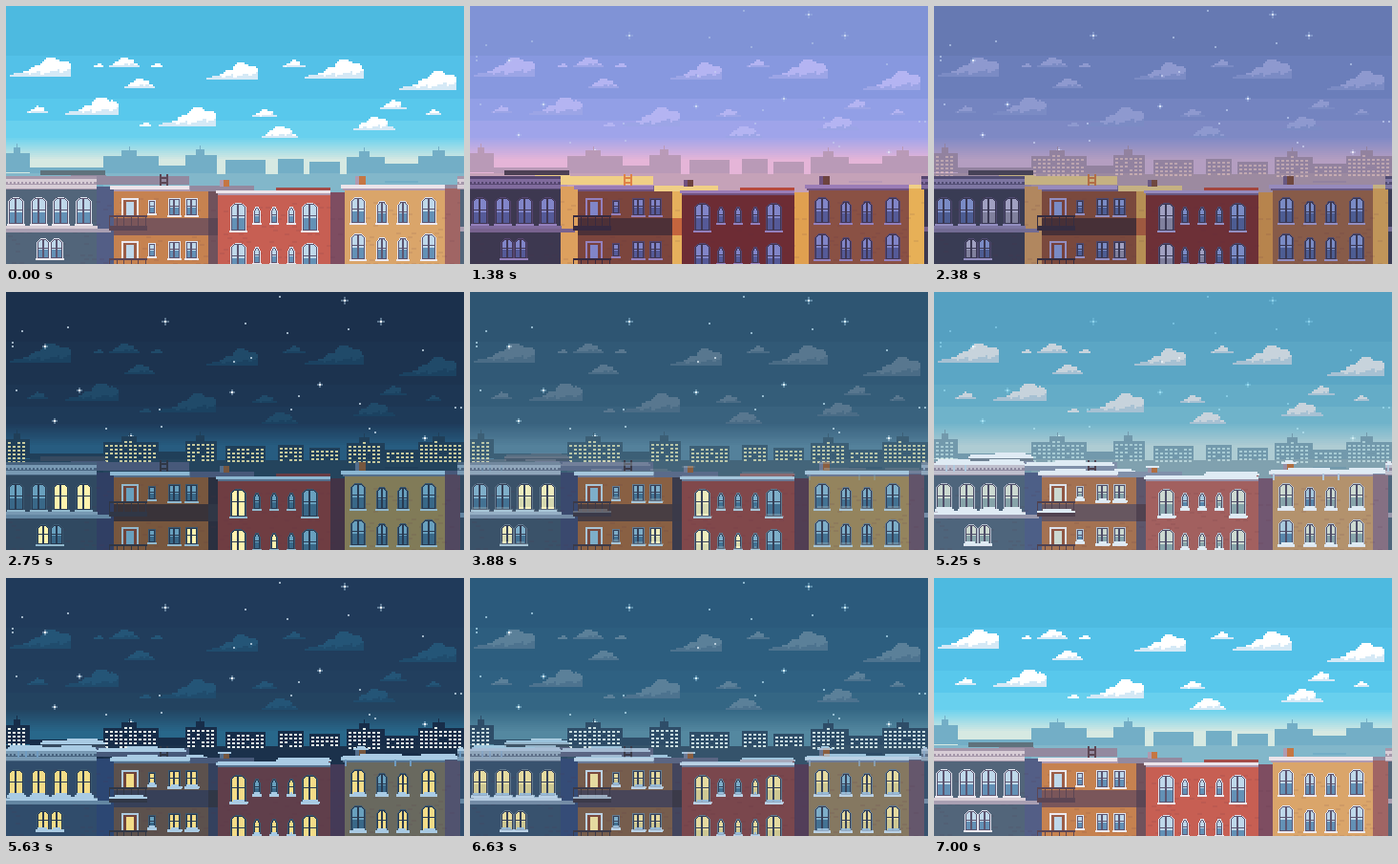
These frames come from a looping animation (480x270 px, 7120 ms). An HTML page with a canvas:

```html
<!DOCTYPE html>
<html>
<head>
<meta charset="utf-8">
<style>
html, body { margin: 0; width: 100%; height: 100%; overflow: hidden; background: #4ebbe1; }
canvas { display: block; width: 480px; height: 270px; image-rendering: pixelated; }
</style>
</head>
<body>
<canvas id="stage" width="480" height="270"></canvas>
<script>
const W = 480, H = 270, LOOP = 7120;

const day = {
  sky: ['#4dbae0', '#53c1e8', '#58c8ec', '#68d0ee', '#d6e9e2'],
  city: ['#73aec6', '#82b7ca'], cloud: ['#ffffff', '#d5e9f6'], stars: 0,
  front: ['#52657a', '#c68250', '#c75f53', '#daa56a'],
  side: ['#535e86', '#70525c', '#7e4d61', '#a06564'],
  brick: '#54304018', cap: '#ece4ea', capShade: '#b09ab0', cornice: '#d8cdd6', corniceShade: '#a597aa',
  ledge: '#a99fb2', roof: ['#5f727c', '#93899f', '#a34c48'], chimney: '#c57643',
  glass: ['#bfd8ea', '#6391b6'], frame: '#5c5570', outline: '#dfe4ef', sill: '#ece9f0',
  shade: '#7a565a', rail: '#5c4654', door: '#9c5e48', lit: 0, glow: '#fff3ae'
};
const dusk = {
  ...day,
  sky: ['#8093d6', '#8798df', '#929fe6', '#9fa4ea', '#e5b5d8'],
  city: ['#b99ab7', '#c5a2b8'], cloud: ['#b4b4f2', '#9ca5e6'], stars: .48,
  front: ['#3d3850', '#7c453d', '#6d2c34', '#8a5144'],
  side: ['#dda05e', '#e6b05c', '#e0a050', '#e7b057'],
  cap: '#9a7cb6', capShade: '#70527f', cornice: '#806b9d', corniceShade: '#55466f',
  ledge: '#78628e', roof: ['#4c4054', '#f0cf86', '#b6493b'], chimney: '#6d433f',
  glass: ['#8185c8', '#555a98'], frame: '#403653', outline: '#55456f', sill: '#9480bd',
  shade: '#4d3037', rail: '#372a40', door: '#78413e'
};
const night = {
  ...day,
  sky: ['#1b304c', '#1c334f', '#1d3653', '#1e3a58', '#275c80'],
  city: ['#203f59', '#24445d'], pane: '#c7c99d', cloud: ['#204a69', '#1b4261'], stars: 1,
  front: ['#304961', '#78573e', '#6f3d42', '#817b58'],
  side: ['#303f64', '#2a3040', '#423346', '#514860'],
  cap: '#8cb7d2', capShade: '#546f8c', cornice: '#7899b3', corniceShade: '#47637f',
  ledge: '#6386a2', roof: ['#364a60', '#47597a', '#683c44'], chimney: '#76573f',
  glass: ['#68a0be', '#396888'], frame: '#283a51', outline: '#3a5870', sill: '#91b8cd',
  shade: '#393339', rail: '#303746', door: '#70443b', lit: .2
};
const winter = {
  ...day,
  sky: ['#68c3e5', '#70cae9', '#7bd2ec', '#8adaef', '#dcefed'],
  city: ['#92bfce', '#a3c8d2'],
  front: ['#596e82', '#bd7e54', '#b96c66', '#cda073'],
  side: ['#59688e', '#6b5e70', '#81617a', '#977a8b'],
  roof: ['#8497a6', '#94a3bb', '#a65d61'],
  shade: '#786064', snow: ['#f2f6fa', '#c5d8e7']
};
const winterNight = {
  ...night,
  sky: ['#203a5a', '#213d5c', '#223f5e', '#234360', '#28678a'],
  city: ['#172d49', '#1b314b'], pane: '#e7efe9', cloud: ['#245577', '#204c6d'],
  front: ['#304c6b', '#5c514d', '#603f4b', '#69695f'],
  side: ['#2c4773', '#34415e', '#443a57', '#51536f'],
  sill: '#adcbe0', shade: '#374058', lit: .75, glow: '#f3dc88', snow: ['#a9cbe4', '#6f9bc0']
};

// Left edge, base, width
const clouds = [
  [4,74,64], [92,64,10], [108,64,32], [152,64,12], [124,86,32], [210,77,54], [290,64,23], [313,76,61], [412,88,60],
  [22,112,22], [62,114,56], [140,126,12], [160,126,60], [258,116,26], [268,138,38], [364,130,44], [392,108,28], [440,114,16]
];
// Left edge, width, top
const blocks = [[0,25,154], [25,77,169], [102,58,157], [160,28,167], [188,33,156], [230,42,161],
  [285,27,160], [318,32,163], [357,40,158], [397,35,165], [432,48,157]];
const sparkles = [[167,31], [355,9], [393,31], [41,57], [77,103], [131,151], [237,105], [329,97], [51,135], [439,153]];

const noise = n => { const v = Math.sin(n * 127.1 + 3.7) * 43758.5453; return v - Math.floor(v); };
const repeat = (count, start, step, draw) => {
  for (let i = 0; i < count; i++) draw(Math.round(start + i * step));
};

function paint(p) {
  const canvas = document.createElement('canvas');
  canvas.width = W; canvas.height = H;
  const g = canvas.getContext('2d');
  let windowId = 0;

  const box = (color, x, y, w, h) => { g.fillStyle = color; g.fillRect(x, y, w, h); };

  function drawSky() {
    [0, 52, 97, 120].forEach((y, i) => box(p.sky[i], 0, y, W, H - y));
    for (let y = 138; y < 200; y += 2) {
      g.globalAlpha = Math.min(1, (y - 136) / 24);
      box(p.sky[4], 0, y, W, 2);
    }
    g.globalAlpha = 1;
  }

  function drawStars() {
    g.globalAlpha = p.stars * .7;
    repeat(22, 1, 1, i => box('#d4e7f4', Math.floor(noise(i) * 240) * 2, Math.floor(noise(i + 50) * 80) * 2, 2, 2));
    sparkles.forEach(([x, y], i) => {
      const r = i < 3 ? 4 : 3;
      g.globalAlpha = p.stars * .4;
      box('#bfdcef', x - r, y - 1, 2 * r, 2);
      box('#bfdcef', x - 1, y - r, 2, 2 * r);
      g.globalAlpha = p.stars;
      box('#ffffff', x - 1, y - 1, 2, 2);
    });
    g.globalAlpha = 1;
  }

  // Round lumps on a thin, tapering base
  function drawCloud([left, base, w]) {
    const h = Math.min(20, Math.max(4, w * .33)), peak = w < 45 ? .5 : .68;
    const lumps = [[peak, .17, 1], [peak + .2, .12, .82], [peak - .22, .15, .58]];
    for (let x = 0; x < w; x += 2) {
      const u = (x + 1) / w;
      let top = h * Math.min(.3, u * .7 + .1, (1 - u) * 3 + .1), tone = .22;
      for (const [center, r, height] of lumps) {
        const d = (u - center) / r;
        if (Math.abs(d) > 1) continue;
        const round = height * h - r * w * .8 * (1 - Math.sqrt(1 - d * d));
        if (round > top) { top = round; tone = .26 + .16 * d; }
      }
      const height = Math.max(2, Math.round(top / 2) * 2);
      const shade = Math.round(h * tone / 2) * 2;
      box(p.cloud[0], left + x, base - height, 2, height);
      if (h > 5) box(p.cloud[1], left + x, base - Math.min(shade, height), 2, Math.min(shade, height));
    }
  }

  function drawCity() {
    box(p.city[1], 0, 176, W, 30);
    for (const [x, w, top] of blocks) {
      const tower = Math.round(w * .32), towerW = Math.round(w * .27), tall = top < 159;
      box(p.city[0], x, top, w, 20);
      if (tall) {
        box(p.city[0], x + tower, top - 6, towerW, 6);
        box(p.city[0], x + tower + (towerW >> 1), top - 10, 1, 4);
      }
      box(p.city[1], x, 175, w, 8);
      if (!p.pane || top > 166) continue;
      for (let y = top - (tall ? 4 : 0) + 3; y < 178; y += 4)
        for (let u = x + 2; u < x + w - 3; u += 5) {
          const inTower = u > x + tower && u + 3 < x + tower + towerW;
          if ((y > top || inTower) && noise(u * 3 + y) > .1) box(p.pane, u, y, 3, 2);
        }
    }
  }

  function drawWall(i, x, y, w, sideW) {
    box(p.front[i], x, y, w, H - y);
    box(p.side[i], x + w, y - 3, sideW, H - y + 3);
    for (let v = y + 8; v < H; v += 4)
      for (let u = x + 2; u < x + w + sideW - 5; u += 8)
        if (noise(u + v * 9 + i) > .8) box(p.brick, u + (v & 4), v, 5, 2);
  }

  function drawSnow(x, y, w, depth) {
    if (!p.snow) return;
    for (let u = 0; u < w; u += 2) {
      const edge = Math.min(1, (u + 2) / 8, (w - u) / 8);
      const rise = Math.round(depth * edge * (.75 + .25 * Math.sin((x + u) * .1)) / 2) * 2;
      box(p.snow[0], x + u, y - rise, 2, rise + 2);
      if (depth > 4 && noise(x + u) > .94) box(p.snow[1], x + u, y + 2, 2, 7);
    }
  }

  function drawWindow(x, y, w, h, arch = true) {
    const lit = noise(++windowId * 7) < p.lit;
    for (let v = 0; v < h; v++) {
      const d = arch ? Math.round(w * .28 * Math.max(0, 1 - v / 5) ** 1.5) : 0;
      box(p.outline, x + d, y + v, w - 2 * d, 1);
      if (v) box(p.frame, x + d + 1, y + v, w - 2 * d - 2, 1);
      if (v < 2 || v > h - 2) continue;
      box(lit ? p.glow : p.glass[v > h * .55 ? 1 : 0], x + d + 2, y + v, w - 2 * d - 4, 1);
    }
    if (w > 10) box(p.frame, x + (w >> 1) - 1, y + 2, 2, h - 2);
    box(p.frame, x + 2, y + Math.round(h * .46), w - 4, 1);
    box(p.sill, x - 1, y + h, w + 2, 2);
    drawSnow(x - 1, y + h - 1, w + 2, 3);
  }

  function drawCornice(x, w) {
    box(p.corniceShade, x, 178, w, 14);
    box(p.cornice, x, 181, w, 3);
    box(p.cornice, x, 187, w, 4);
    for (let u = x + 2; u < x + w - 1; u += 4) box(p.cornice, u, 184, 2, 2);
    drawSnow(x, 179, w, 5);
  }

  function drawBlueHouse() {
    box(p.roof[0], 36, 172, 68, 5);
    box(p.roof[1], 68, 177, 37, 6);
    drawWall(0, 0, 192, 95, 18);
    drawCornice(0, 95);
    repeat(4, 2, 23.5, x => drawWindow(x, 200, 17, 28));
    box(p.cornice, 0, 230, 96, 3);
    box(p.ledge, 0, 233, 110, 4);
    repeat(2, 32, 14, x => drawWindow(x, 243, 14, 21));
    drawSnow(36, 172, 68, 4);
    drawSnow(0, 231, 96, 2);
  }

  function drawBalcony(y) {
    box(p.rail, 108, y, 40, 2);
    box(p.rail, 108, y + 11, 40, 5);
    repeat(6, 108, 7.6, x => box(p.rail, x, y, 1, 12));
    drawSnow(108, y + 10, 40, 2);
  }

  function drawOrangeHouse() {
    box(p.roof[1], 95, 178, 97, 9);
    drawWall(1, 113, 193, 99, 12);
    box(p.cap, 109, 188, 103, 4);
    box(p.capShade, 113, 192, 100, 2);
    box(p.ledge, 192, 188, 28, 4);
    const ladder = p === dusk ? '#df8247' : p.rail;
    repeat(2, 161, 7, x => box(ladder, x, 176, 2, 12));
    repeat(2, 179, 5, y => box(ladder, 161, y, 9, 2));
    box(p.shade, 113, 222, 99, 18);
    box(p === dusk ? '#c4653e' : p.rail, 212, 222, 12, 18);
    repeat(2, 201, 45, y => {
      box(p.sill, 121, y, 18, 20);
      box(p.door, 123, y + 2, 14, 18);
      box(p.lit > .5 ? p.glow : p.glass[0], 126, y + 4, 8, 14);
      drawWindow(149, y + 2, 8, 14, false);
      repeat(2, 170, 18, x => drawWindow(x, y, 13, 18, false));
      drawBalcony(y + 18);
    });
    drawSnow(95, 180, 94, 4);
    drawSnow(109, 189, 103, 4);
  }

  function drawRedHouse() {
    box(p.roof[1], 193, 188, 67, 6);
    box(p.roof[2], 283, 190, 57, 5);
    box(p.chimney, 224, 182, 10, 7);
    box(p.capShade, 224, 182, 4, 7);
    drawWall(2, 222, 198, 118, 15);
    box(p.cap, 220, 193, 120, 3);
    box(p.capShade, 222, 196, 118, 2);
    repeat(2, 206, 42, y => {
      repeat(2, 235, 75, x => drawWindow(x, y, 17, 29));
      repeat(3, 259, 18, x => drawWindow(x, y + 4, 8, 17));
    });
    drawSnow(220, 194, 120, 3);
    drawSnow(283, 190, 57, 3);
    drawSnow(222, 182, 13, 2);
  }

  function drawTanHouse() {
    box(p.chimney, 366, 178, 11, 9);
    box(p.capShade, 366, 178, 4, 9);
    drawWall(3, 355, 193, 105, 16);
    box(p.cap, 351, 187, 109, 4);
    box(p.capShade, 353, 191, 107, 2);
    box(p.roof[1], 460, 187, 16, 4);
    repeat(2, 200, 38, y => {
      repeat(2, 361, 74, x => drawWindow(x, y, 16, 27));
      repeat(2, 388, 22, x => drawWindow(x, y + 4, 12, 23));
    });
    drawSnow(351, 188, 124, 5);
    drawSnow(364, 178, 15, 3);
    box(p.front[0], 476, 190, 4, 80);
    box(p.ledge, 476, 231, 4, 5);
    drawCornice(473, 7);
  }

  drawSky();
  clouds.forEach(drawCloud);
  drawStars();
  drawCity();
  drawBlueHouse();
  drawOrangeHouse();
  drawRedHouse();
  drawTanHouse();
  return canvas;
}

const scenes = [day, dusk, night, winter, winterNight].map(paint);
const fades = [[1000, 1380], [2380, 2750], [3880, 4250], [5250, 5630], [6630, 7000]];
const ctx = document.getElementById('stage').getContext('2d');

function render(t) {
  let scene = 0, mix = 0;
  fades.forEach(([start, end], i) => {
    if (t >= end) scene = (i + 1) % scenes.length;
    else if (t >= start) mix = (1 + Math.floor((t - start) / (end - start) * 3)) / 4;
  });
  ctx.globalAlpha = 1;
  ctx.drawImage(scenes[scene], 0, 0);
  if (mix) {
    ctx.globalAlpha = mix;
    ctx.drawImage(scenes[(scene + 1) % scenes.length], 0, 0);
  }
}

const origin = performance.now();
function tick() {
  render((performance.now() - origin) % LOOP);
  requestAnimationFrame(tick);
}
tick();
</script>
</body>
</html>
```
